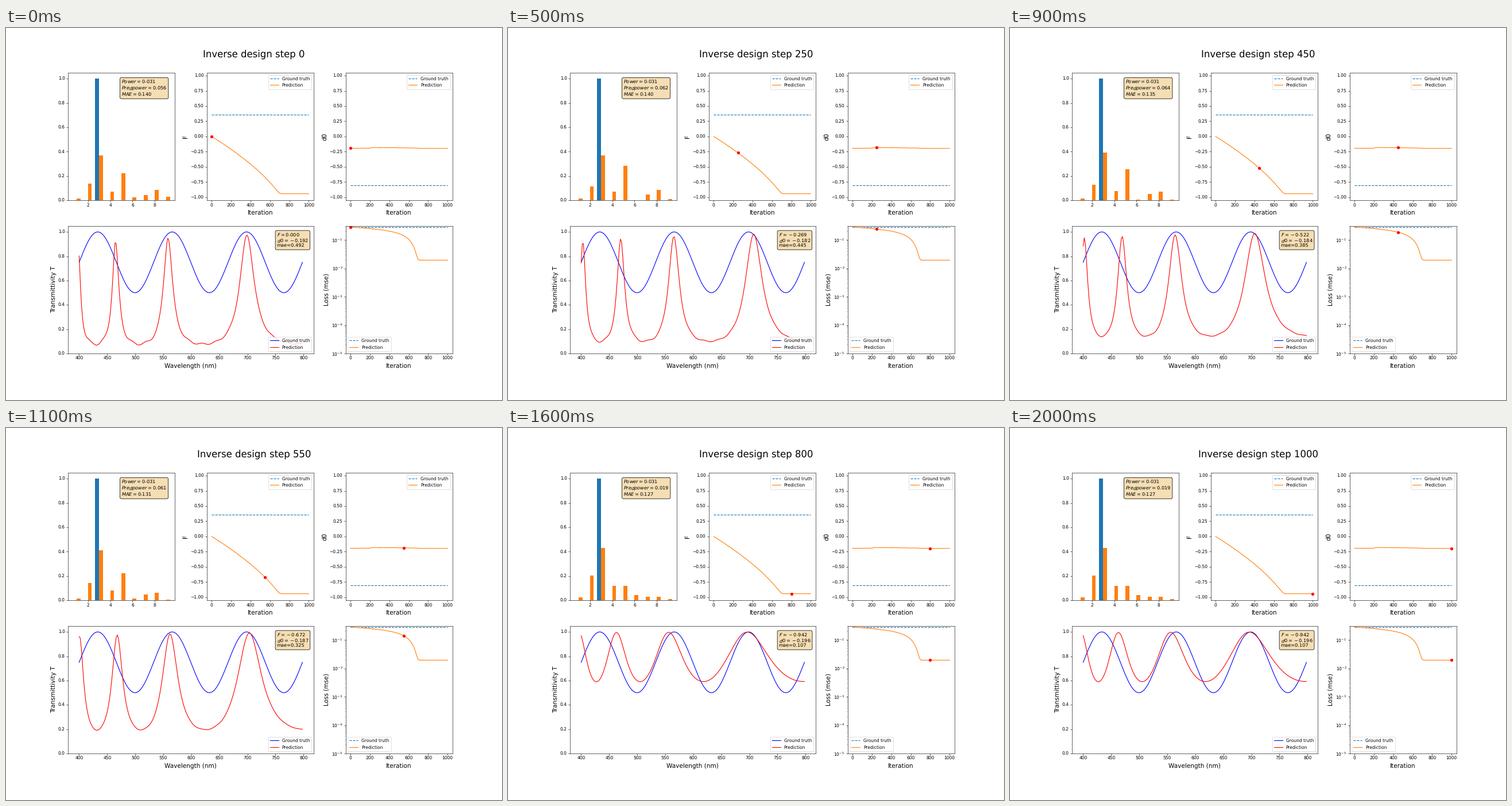
These frames come from a looping animation (864x648 px, 2100 ms). A matplotlib script:

```python
import numpy as np
import matplotlib.pyplot as plt
from matplotlib.animation import FuncAnimation

FRAMES, INTERVAL, STEP = 21, 100, 50
FLOOR, KNEE = -0.942, 0.018

plt.rcParams["font.family"] = "DejaVu Sans"
plt.rcParams["text.hinting"] = "none"

its = np.arange(1001)
lam = np.arange(400, 800, 2)
modes = np.arange(1, 10)
truth = 0.75 + 0.25 * np.sin(6 * np.pi * (lam - 400) / 398)

# F descends along a quartic and settles softly on its bound
descent = np.polyfit([0, 0.15, 0.25, 0.45, 0.65],
                     [0, -0.156, -0.269, -0.522, -0.847], 4)
F = FLOOR + KNEE * np.logaddexp(0, (np.polyval(descent, its / 1000) - FLOOR) / KNEE)

# d0 stays nearly flat, with small dips every 100 iterations while raised
d0 = np.interp(its, [0, 12, 205, 215, 450, 650, 715],
               [-.192, -.195, -.1935, -.1817, -.184, -.190, -.196])
d0 -= 0.4 * (d0 + 0.196) * np.exp(-((its % 100 - 5) / 4) ** 2)


def spectrum(f, d):
    """Airy transmission of a cavity, with damped peaks and a slight ripple."""
    order = (2826 + 3286 * (d + 0.182) + 0.03 * (lam - 560)) / lam
    airy = 1 / (1 + (12.5 + 12.54 * f) * np.sin(np.pi * order) ** 2)
    damping = 0.025 * (order - 3) * airy
    ripple = 0.003 * (order - 2) * (1 + np.cos(2 * np.pi * (lam - 419) / 25))
    return airy + (1 + f) * (ripple * (1 - airy) - damping)


def mode_power(t):
    """Power of the first nine harmonics."""
    return 2 * np.abs(np.fft.rfft(t)[modes] / t.size) ** 2


preds = np.array([spectrum(f, d) for f, d in zip(F, d0)])
loss = np.mean((preds - truth) ** 2, axis=1)


def num(v):
    return f"{round(float(v), 3) + 0.0:.3f}"


fig = plt.figure(figsize=(16, 12), dpi=54, facecolor="white")
grid = fig.add_gridspec(2, 3, left=0.125, right=0.9, bottom=0.125, top=0.88,
                        wspace=0.3, hspace=0.2)
title = fig.suptitle("", fontsize=22, y=0.941)


def note(ax, x):
    return ax.text(x, 0.95, "", transform=ax.transAxes, fontsize=11, va="top",
                   linespacing=1.0, bbox=dict(boxstyle="round", facecolor="wheat"))


def history(cell, label, target, values, loc):
    ax = fig.add_subplot(cell)
    ax.plot(its, np.full(its.size, target), "--", label="Ground truth")
    ax.plot(its, values, label="Prediction")
    dot, = ax.plot([0], [values[0]], "ro")
    ax.set_xlim(-50, 1050)
    ax.set_xlabel("Iteration", fontsize=14)
    ax.set_ylabel(label, fontsize=14)
    ax.legend(loc=loc, fontsize=10)
    return ax, dot


# Harmonic bars
bar_ax = fig.add_subplot(grid[0, 0])
width = 0.35
bar_ax.bar(modes - width / 2, modes == 3, width)
bars = bar_ax.bar(modes + width / 2, modes * 0, width)
bar_ax.set_xlim(0.215, 9.785)
bar_ax.set_ylim(0, 1.05)
bar_note = note(bar_ax, 0.5)

# Parameter and loss histories
f_ax, f_dot = history(grid[0, 1], "F", 0.362, F, "upper right")
d_ax, d_dot = history(grid[0, 2], "d0", -0.806, d0, "upper right")
for ax in (f_ax, d_ax):
    ax.set_ylim(-1.05, 1.05)
loss_ax, loss_dot = history(grid[1, 2], "Loss (mse)", 0.286, loss, "lower left")
loss_ax.set_yscale("log")
loss_ax.set_ylim(1e-5, 0.314)

# Transmission spectrum
spec_ax = fig.add_subplot(grid[1, :2])
spec_ax.plot(lam, truth, "b", label="Ground truth")
pred, = spec_ax.plot(lam, preds[0], "r", label="Prediction")
spec_ax.set_xlim(380.1, 817.9)
spec_ax.set_ylim(0, 1.05)
spec_ax.set_xlabel("Wavelength (nm)", fontsize=14)
spec_ax.set_ylabel("Transmittivity T", fontsize=14)
spec_ax.legend(loc="lower right", fontsize=10)
spec_note = note(spec_ax, 0.85)


def update(i):
    n = i * STEP
    power = mode_power(preds[n])
    share = power / power.sum()
    title.set_text(f"Inverse design step {n}")
    for bar, h in zip(bars, share):
        bar.set_height(h)
    for dot, values in ((f_dot, F), (d_dot, d0), (loss_dot, loss)):
        dot.set_data([n], [values[n]])
    pred.set_ydata(preds[n])
    bar_note.set_text(f"$Power={num(mode_power(truth).sum())}$\n"
                      f"$Predpower={num(power.sum())}$\n"
                      f"$MAE={num(np.abs(share - (modes == 3)).mean())}$")
    spec_note.set_text(f"$F={num(F[n])}$\n$d0={num(d0[n])}$\n"
                       f"mae={num(np.abs(preds[n] - truth).mean())}")
    return []


anim = FuncAnimation(fig, update, frames=FRAMES, interval=INTERVAL, repeat=True)
plt.show()
```
